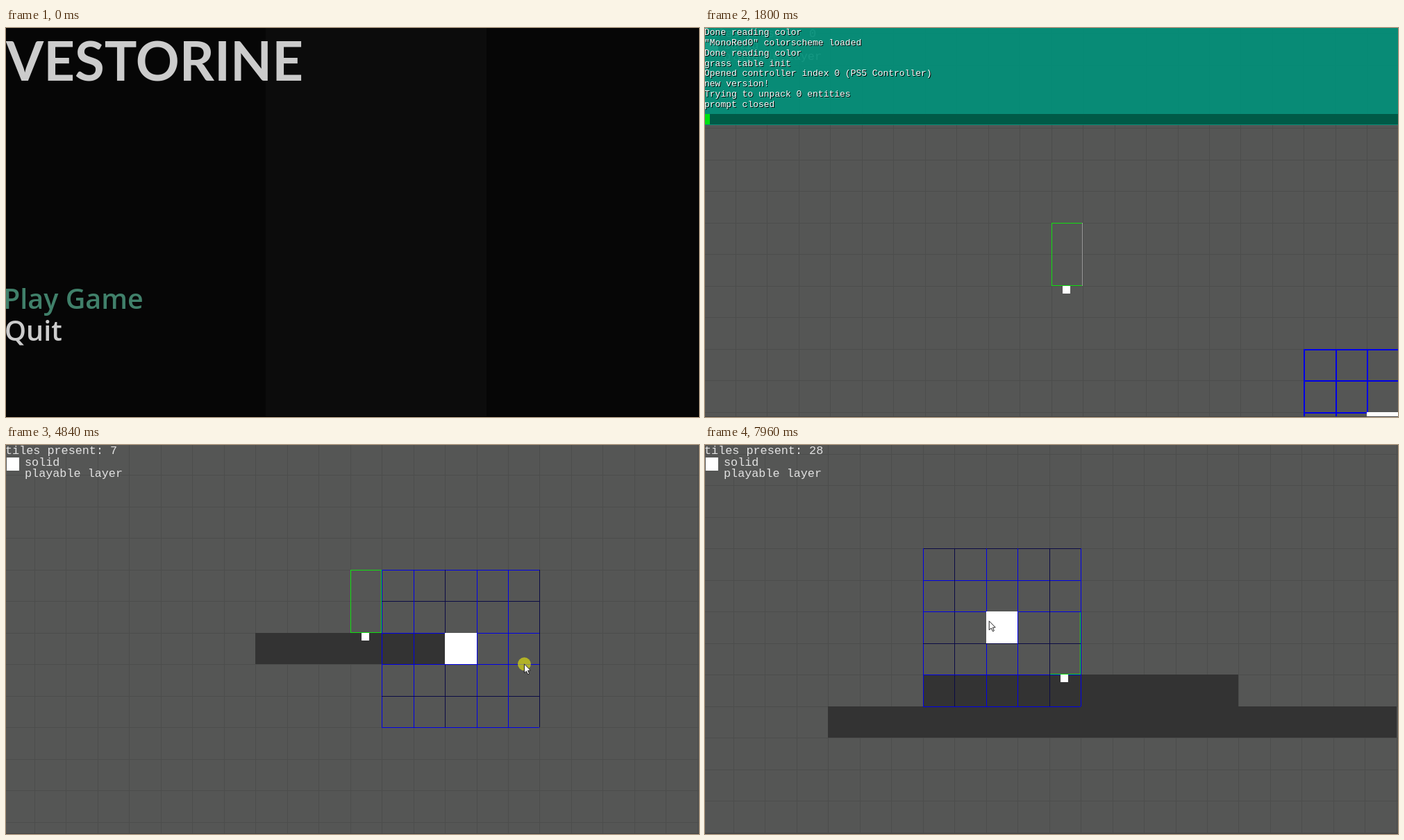
An HTML page with a canvas that plays this animation: 998x561 px, repeating every 8000 ms.

```html
<!DOCTYPE html>
<html lang="en">
<head>
<meta charset="utf-8">
<title>Level editor</title>
<style>
html, body { margin: 0; width: 100%; height: 100%; overflow: hidden; background: #000; }
canvas { display: block; width: 998px; height: 561px; }
</style>
</head>
<body>
<canvas id="stage" width="998" height="561"></canvas>
<script>
const ctx = document.getElementById('stage').getContext('2d');
const W = 998, H = 561, LOOP = 8000;
const CELL = 45.48, LEFT = 43.8, TOP = 7.8;
const LAG = 60; // the brush trails the pointer
const EDITOR_START = 1800, PAINT_START = 4590, PAINT_END = 6050;
const DRAG_1 = [3430, 4300], DRAG_2 = [7560, 7960];
const MONO = '"Liberation Mono", monospace';
const GREEN = '#10e010';

// Pointer stops: time, column, row
const STOPS = [
  [2600, 20.5, 12.1], [3050, 0.5, 6.5], [3360, 7.15, 9.15], [4300, 7.15, 9.15],
  [4430, 3.5, 9.5], [PAINT_START, 7.4, 8.5], [4840, 15.46, 8.99], [4930, 20.4, 9.4],
  [5120, 20.4, 9.4], [5500, 3.5, 9.4], [5600, 6.5, 8.95], [5970, 15.2, 9.46],
  [6040, 15.2, 9.46], [6800, 7.5, 7.8], [7500, 7.5, 7.8], [7560, 8.1, 6.3]
];
const LOG = ['Done reading color', '"MonoRed0" colorscheme loaded', 'Done reading color',
  'grass table init', 'Opened controller index 0 (PS5 Controller)', 'new version!',
  'Trying to unpack 0 entities', 'prompt closed'];

const ramp = (t, [from, to]) => Math.min(1, Math.max(0, (t - from) / (to - from)));
const during = (t, [from, to]) => t >= from && t < to;
const wave = u => Math.sin(Math.PI * u);

function pointerAt(t) {
  const next = STOPS.findIndex(stop => stop[0] > t);
  const [t1, c1, r1] = STOPS.at(next);
  const [t0, c0, r0] = next > 0 ? STOPS[next - 1] : STOPS.at(next);
  const u = t1 > t0 ? ramp(t, [t0, t1]) : 0;
  return [c0 + (c1 - c0) * u, r0 + (r1 - r0) * u];
}

const brushCell = t => pointerAt(t - LAG).map(Math.floor);

// Both drags swing the view around before letting it settle.
function panAt(t) {
  const a = ramp(t, DRAG_1), b = ramp(t, DRAG_2);
  return [
    -3 * a + 150 * wave(2 * a) - 130 * wave(a) - 148 * wave(b),
    -101 * a - 235 * wave(a) + 60.5 * b - 117 * wave(b)
  ];
}

const tiles = new Map();
for (let t = PAINT_START + LAG; t < PAINT_END; t += 2) {
  const cell = brushCell(t);
  if (!tiles.has(cell.join())) tiles.set(cell.join(), { cell, placed: t });
}

function rect(color, x, y, w, h) {
  ctx.fillStyle = color;
  ctx.fillRect(x, y, w, h);
}

function text(str, x, y, font, color) {
  ctx.font = font;
  ctx.fillStyle = color;
  ctx.fillText(str, x, y);
}

const shade = (rgb, k) => `rgb(${rgb.map(v => Math.round(v * k)).join()})`;

function drawMenu(t) {
  const light = 0.8 + 0.1 * t / EDITOR_START;
  const pulse = 0.75 - 0.25 * Math.cos(2 * Math.PI * t / 2640);
  const white = shade([255, 255, 255], light);
  const itemFont = '600 39.5px "Open Sans", sans-serif';
  rect(shade([8, 8, 8], light), 0, 0, W, 560);
  rect(shade([15, 15, 15], light), 374, 0, 318, 560);
  text('VESTORINE', 0, 75.5, 'bold 78px Lato, sans-serif', white);
  text('Play Game', -4, 405, itemFont, shade([127, 255, 212], pulse));
  text('Quit', -2, 451, itemFont, white);
}

function drawPointer(x, y) {
  const arrow = new Path2D('M0 0V13L3 10.3L5.3 15L7.2 14L5.1 9.5L9 9.2Z');
  ctx.save();
  ctx.translate(x, y);
  ctx.fillStyle = '#fff';
  ctx.fill(arrow);
  ctx.strokeStyle = '#222';
  ctx.stroke(arrow);
  ctx.restore();
}

function drawBrush(t, [col, row], sx, sy) {
  const weight = t < STOPS[0][0] ? 2 : 1, phase = t < DRAG_1[1] ? 0 : 1;
  const x0 = sx(col - 2), y0 = sy(row - 2), x1 = sx(col + 3), y1 = sy(row + 3);
  // Thin lines alternate in tone, like a downscaled hairline.
  const tone = k => weight === 1 && (k + phase) % 3 === 2 ? '#0b0b45' : '#0000e6';
  for (let i = -2; i <= 3; i++) {
    rect(tone(row + i), x0, sy(row + i), x1 - x0, weight);
    rect(tone(col + i), sx(col + i), y0, weight, y1 - y0);
  }
  rect('#fff', sx(col), sy(row), sx(col + 1) - sx(col), sy(row + 1) - sy(row));
}

function drawPlayer(t, x, y, w, h) {
  rect(GREEN, x, y, w, 1);
  rect(GREEN, x, y + h - 1, w, 1);
  rect(GREEN, x, y, 1, h);
  rect(t < DRAG_1[1] ? '#999' : GREEN, x + w - 1, y, 1, h);
}

function drawEditor(t) {
  const [panX, panY] = panAt(t);
  const viewX = c => LEFT + panX + c * CELL, viewY = r => TOP + panY + r * CELL;
  const sx = c => Math.round(viewX(c)), sy = r => Math.round(viewY(r));

  rect('#555655', 0, 0, W, H);
  for (let k = -8; k < 32; k++) {
    rect('#4c4d4c', sx(k), 0, 1, H);
    rect('#4c4d4c', 0, sy(k), W, 1);
  }
  const present = [...tiles.values()].filter(tile => tile.placed <= t);
  for (const { cell: [c, r] } of present) {
    rect('#333', sx(c), sy(r), sx(c + 1) - sx(c), sy(r + 1) - sy(r));
  }

  const px = sx(10), py = sy(6), feet = sy(8);
  drawPlayer(t, px, py, sx(11) - px, feet - py);
  drawBrush(t, brushCell(t), sx, sy);
  rect('#fff', px + 16, feet, 11, 11);

  const font = `16.8px ${MONO}`;
  text('tiles present: ' + present.length, -1, 13, font, '#e2e2e2');
  text('solid', 27, 30, font, '#e2e2e2');
  text('playable layer', 27, 46, font, '#e2e2e2');
  rect('#fff', 1, 18, 18, 19);

  if (t > STOPS[0][0]) {
    const [c, r] = pointerAt(t), x = viewX(c), y = viewY(r);
    const painting = during(t, [PAINT_START, PAINT_END]);
    const dragging = during(t + 30, DRAG_1) || during(t + 30, DRAG_2);
    if (painting || dragging) {
      ctx.fillStyle = painting ? 'rgba(255,255,0,.55)' : 'rgba(80,255,255,.75)';
      ctx.beginPath();
      ctx.arc(x, y, 9.5, 0, 2 * Math.PI);
      ctx.fill();
    }
    drawPointer(x, y);
  }
  rect('#444', 0, 560, W, 1);
}

function drawConsole(t) {
  const bottom = Math.round(140 * (ramp(t, [600, 930]) - ramp(t, [1950, 2405])));
  if (bottom <= 0) return;
  const font = `13px ${MONO}`;
  const typed = t < 1730 ? 'edit'.slice(0, Math.max(0, Math.ceil((t - 1190) / 70))) : '';
  rect('rgba(0,144,121,.91)', 0, 0, W, bottom);
  rect('#005a47', 0, bottom - 16, W, 15);
  ctx.save();
  ctx.shadowColor = '#000';
  ctx.shadowOffsetX = ctx.shadowOffsetY = 1;
  LOG.forEach((line, i) =>
    text(line, -1, bottom - 26 - (LOG.length - 1 - i) * 14.85, font, '#fff'));
  text(typed, -1, bottom - 5, font, '#fff');
  ctx.restore();
  rect('#00e010', Math.round(-1.4 + typed.length * 7.8), bottom - 16, 8, 15);
}

const start = performance.now();
function frame() {
  const t = (performance.now() - start) % LOOP;
  rect('#000', 0, 0, W, H);
  if (t < EDITOR_START) drawMenu(t);
  else drawEditor(t);
  drawConsole(t);
  requestAnimationFrame(frame);
}
frame();
</script>
</body>
</html>
```
